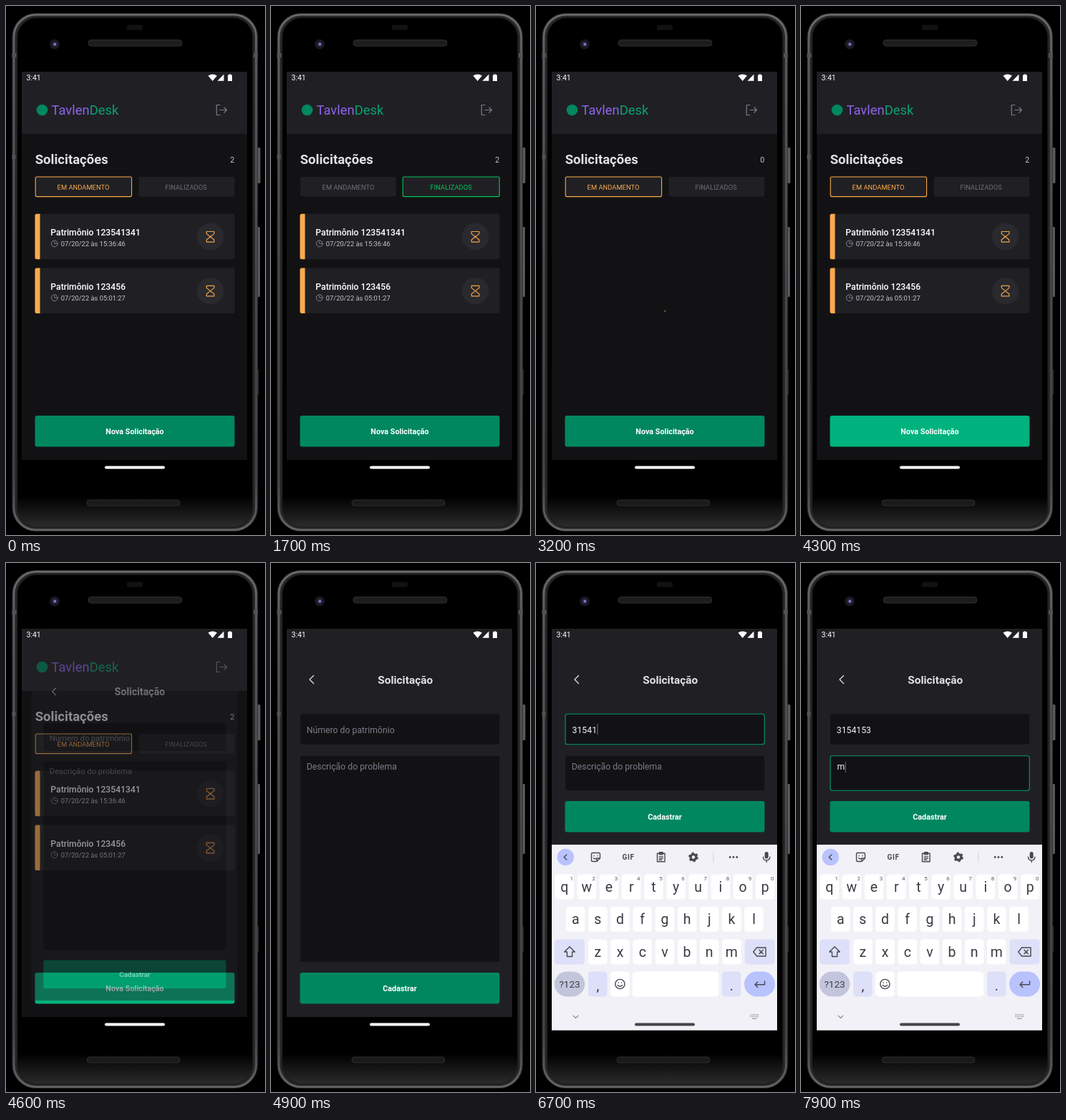
Animation, 362 px wide and 740 px high, one loop 8 s. Source, as an HTML page:

```html
<!DOCTYPE html>
<html lang="pt-BR">
<head>
<meta charset="utf-8">
<title>Solicitações</title>
<style>
html, body { margin: 0; width: 100%; height: 100%; overflow: hidden; background: #000; }
svg { display: block; width: 362px; height: 740px; font-family: Roboto, "Noto Sans", sans-serif; }
text { white-space: pre; }
.line { fill: none; stroke-linecap: round; stroke-linejoin: round; }
.mid { text-anchor: middle; }
.tab { font-size: 9.4px; text-anchor: middle; }
.btn { font-size: 10.8px; font-weight: 700; fill: #fff; text-anchor: middle; }
.field { font-size: 12.25px; }
.letter { font-size: 19.5px; fill: #3b3c43; text-anchor: middle; }
.hint { font-size: 8px; fill: #55565e; text-anchor: middle; }
</style>
</head>
<body>
<svg viewBox="0 0 362 740">
  <defs>
    <linearGradient id="rim" x1="0" y1="0" x2="0" y2="1">
      <stop offset="0" stop-color="#6c6c6e"/><stop offset=".1" stop-color="#5c5c5e"/>
      <stop offset=".5" stop-color="#4a4a4c"/><stop offset=".9" stop-color="#444446"/>
      <stop offset="1" stop-color="#666668"/>
    </linearGradient>
    <linearGradient id="face" x1="0" y1="0" x2="0" y2="1">
      <stop offset=".94" stop-color="#000"/><stop offset="1" stop-color="#2c2c2d"/>
    </linearGradient>
    <clipPath id="glass"><rect x="22" y="92" width="315" height="561.5"/></clipPath>
    <clipPath id="app"><rect x="22" y="92" width="315" height="543"/></clipPath>
    <g id="hourglass" class="line" stroke="#f0a148" stroke-width="1.2">
      <path d="M-5.3-7.3H5.3V-4.2L0 0L-5.3-4.2ZM-5.3 7.3H5.3V4.2L0 0L-5.3 4.2Z"/>
    </g>
  </defs>

  <!-- phone body -->
  <g fill="#5a5a5b">
    <rect x="351" y="198" width="4.5" height="50" rx="1.5"/>
    <rect x="351" y="309" width="4" height="98" rx="1.5"/>
    <rect x="351" y="508" width="2" height="36" rx="1" fill="#333"/>
  </g>
  <rect x="8.5" y="10" width="343.5" height="725" rx="33" fill="#333335"/>
  <rect x="11" y="12.2" width="338.5" height="720.6" rx="31" fill="#29292a" stroke="url(#rim)" stroke-width="2.6"/>
  <rect x="15.5" y="16" width="329.5" height="713" rx="28" fill="url(#face)" stroke="#1c1c1d" stroke-width="1.5"/>
  <path d="M8.5 66h6v6h-6zM8.5 208h5v6h-5zM346 66h6v6h-6z" fill="#525254"/>
  <rect x="169" y="26.5" width="22" height="7" rx="2" fill="#121213"/>
  <rect x="115" y="47.5" width="131" height="8.5" rx="4" fill="#1d1d1e" stroke="#303031"/>
  <rect x="113" y="691" width="130" height="8" rx="4" fill="#1a1a1b" stroke="#2d2d2e"/>
  <circle cx="68" cy="53.5" r="7" fill="#17171d"/>
  <circle cx="68" cy="53.5" r="4" fill="#24233f"/>
  <circle cx="68.3" cy="53.5" r="1.9" fill="#7f7cc8"/>

  <g clip-path="url(#app)">
    <g id="home">
      <rect x="22" y="92" width="315" height="543" fill="#121214"/>
      <rect x="22" y="92" width="315" height="87" fill="#202024"/>
      <circle cx="50.5" cy="145.5" r="7.8" fill="#00875f"/>
      <text x="63.5" y="151.5" font-size="18.4" fill="#8f63f0">Tavlen<tspan fill="#0aa173">Desk</tspan></text>
      <path class="line" d="M299 138.5H294.3V152.5H299M299 145.5H308.5M305 142L308.5 145.5L305 149" stroke="#7c7c8a" stroke-width="1.2"/>
      <text x="40.7" y="221.2" font-size="18.5" font-weight="700" fill="#e1e1e6">Solicitações</text>
      <text id="count" x="319.3" y="219.3" font-size="10.8" text-anchor="end" fill="#c4c4cc"></text>
      <rect id="openBox" y="239" height="27.6" rx="2"/>
      <text id="openText" class="tab" x="108" y="256.6">EM ANDAMENTO</text>
      <rect id="doneBox" y="239" height="27.6" rx="2"/>
      <text id="doneText" class="tab" x="251.7" y="256.6">FINALIZADOS</text>
      <g id="cards"></g>
      <circle id="spinner" class="line" cx="180" cy="433" r="6.3" stroke="#fba94c" stroke-width="1.4" pathLength="100"/>
      <rect id="newBtn" x="40.5" y="573.1" width="279" height="43.4" rx="3"/>
      <text class="btn" x="180" y="598.8">Nova Solicitação</text>
    </g>
  </g>

  <g clip-path="url(#glass)">
    <g id="form">
      <rect x="22" y="92" width="315" height="543" fill="#202024"/>
      <path class="line" d="M59.5 157.5L54 163L59.5 168.5" stroke="#e1e1e6" stroke-width="1.3"/>
      <text class="mid" x="187.7" y="168.6" font-size="15.4" font-weight="700" fill="#e1e1e6">Solicitação</text>
      <rect id="numBox" x="41" y="211.2" width="278.3" height="42.6" rx="3" fill="#121214"/>
      <text id="numText" class="field" y="238"></text>
      <rect id="descBox" x="41" y="269.7" width="278.3" rx="3" fill="#121214"/>
      <text id="descText" class="field" y="289"></text>
      <rect id="caret" width="1" height="15" fill="#74747c"/>
      <g id="send">
        <rect x="40.5" y="573.1" width="279" height="43.4" rx="3" fill="#00875f"/>
        <text class="btn" x="180" y="598.8">Cadastrar</text>
      </g>
    </g>
    <rect id="panel" x="22" y="394" width="315" height="260" fill="#fafafa"/>
    <g id="keys"></g>
    <rect id="strip" x="22" y="635" width="315" height="19" fill="#000" opacity=".42"/>
  </g>
  <rect id="pill" x="138" y="643.6" width="84" height="4" rx="2"/>

  <!-- status bar -->
  <text x="28.5" y="104.4" font-size="10.5" fill="#fff">3:41</text>
  <path d="M282.5 97.5Q288.7 93.3 295 97.5L288.7 105ZM295.5 104.8L304.5 95.6V104.8ZM310 96.6H311.5V95.4H314.5V96.6H316V105H310Z" fill="#fff"/>
</svg>

<script>
const $ = id => document.getElementById(id);
const set = (el, attrs) => { for (const k in attrs) el.setAttribute(k, attrs[k]); };
const show = (el, on) => { el.style.display = on ? "" : "none"; };
const LOOP = 8000, STEP = 100;
const NUMBER = "3154153";

function card(y, number, date) {
  return `<g transform="translate(0 ${y})">
    <rect x="40.5" width="279" height="63.5" rx="3" fill="#202024"/>
    <path d="M47.5 0H43Q40.5 0 40.5 2.5V61Q40.5 63.5 43 63.5H47.5Z" fill="#fba94c"/>
    <text x="62.3" y="30" font-size="12.2" font-weight="500" fill="#fff">Patrimônio ${number}</text>
    <g class="line" stroke="#8d8d99" stroke-width=".9"><circle cx="67.8" cy="41.6" r="4.4"/><path d="M67.8 39V41.6H70.5"/></g>
    <text x="76.8" y="45" font-size="9.4" fill="#c4c4cc">${date}</text>
    <circle cx="285.6" cy="32" r="18.7" fill="#29292e"/>
    <use href="#hourglass" x="285.6" y="32"/>
  </g>`;
}
$("cards").innerHTML = card(290.8, "123541341", "07/20/22 às 15:36:46") +
                       card(366.6, "123456", "07/20/22 às 05:01:27");

const key = (cx, cy, w, fill = "#fff", r = 4.5) =>
  `<rect x="${cx - w / 2}" y="${cy - 17.5}" width="${w}" height="35" rx="${r}" fill="${fill}"/>`;
const icon = (x, y, d, color = "#484950", w = 1.4) =>
  `<path class="line" transform="translate(${x} ${y})" d="${d}" stroke="${color}" stroke-width="${w}"/>`;

function keyboard() {
  const soft = "#dde0f8", pitch = 31.17;
  let s = `<rect x="22" y="394" width="315" height="260" fill="#f2f1f8"/>
    <circle cx="41.3" cy="411.5" r="11.7" fill="#b8c2fd"/>`;
  s += icon(41, 411.5, "M1.8-3.6L-1.8 0L1.8 3.6");
  s += icon(83.5, 411.5, "M-4.5-6H4.5Q6-6 6-4.5V1.5L1.5 6H-4.5Q-6 6-6 4.5V-4.5Q-6-6-4.5-6ZM6 1.5H1.5V6M-2.5-2V-1.8M2.5-2V-1.8M-3 1.2Q-1 3.5 1 1.5");
  s += `<text class="mid" x="129" y="415.2" font-size="10" font-weight="700" letter-spacing=".6" fill="#484950">GIF</text>`;
  s += icon(174.8, 411.5, "M-5.3-5.2H5.3V6.3H-5.3ZM-2.3-6.7H2.3V-3.6H-2.3ZM-2.6-.6H2.6M-2.6 1.6H2.6M-2.6 3.8H1");
  s += `<circle cx="220" cy="411.5" r="3.9" fill="none" stroke="#484950" stroke-width="3.2"/>
    <circle cx="220" cy="411.5" r="5.9" fill="none" stroke="#484950" stroke-width="2" stroke-dasharray="3 3.18"/>
    <path d="M248 404V419" stroke="#d6d5dd"/>`;
  s += [-4.8, 0, 4.8].map(d => `<circle cx="${276 + d}" cy="411.5" r="1.4" fill="#484950"/>`).join("");
  s += `<rect x="319.7" y="404" width="5" height="9.5" rx="2.5" fill="#484950"/>`;
  s += icon(322.2, 411.5, "M-4.7-.3Q-4.5 4.4 0 4.4T4.7-.3M0 4.5V7");
  [["qwertyuiop", 39.7, 453], ["asdfghjkl", 55.2, 498.3], ["zxcvbnm", 86.4, 544]].forEach(([row, x0, y]) =>
    [...row].forEach((c, i) => {
      const x = x0 + i * pitch;
      s += key(x, y, 26.6) + `<text class="letter" x="${x}" y="${y + 7}" data-c="${c}"></text>`;
      if (y === 453) s += `<text class="hint" x="${x + 10}" y="${y - 8.6}">${(i + 1) % 10}</text>`;
    }));
  s += key(47, 544, 42, soft) + key(312.6, 544, 42, soft);
  s += `<path id="shift" transform="translate(47 544)" d="M0-7.3L7.3 0H3.6V6.5H-3.6V0H-7.3Z" stroke="#484950" stroke-width="1.4" stroke-linejoin="round"/>`;
  s += icon(312.6, 544, "M-4-6H8.5V6H-4L-8.8 0ZM-.6-2.7L4.8 2.7M4.8-2.7L-.6 2.7");
  s += key(47, 589, 42.5, "#c2c5dc", 17.5) + key(86.3, 589, 26.5, soft) + key(117.4, 589, 26.5) +
       key(195, 589, 120.5) + key(273.3, 589, 26.5, soft) + key(312.6, 589, 43, "#b8c2fd", 17.5);
  s += `<text class="mid" x="47" y="593.8" font-size="13.5" fill="#3b3c43">?123</text>
    <text class="letter" x="86.3" y="598">,</text><text class="letter" x="273.3" y="598">.</text>
    <circle cx="117.4" cy="589" r="6.6" fill="none" stroke="#484950" stroke-width="1.4"/>`;
  s += icon(117.4, 589, "M-2.3-2V-1.7M2.3-2V-1.7M-3.2 1.5Q0 5 3.2 1.5");
  s += icon(312.6, 589, "M7-4V.8H-6.5M-2.8-3L-6.5 .8L-2.8 4.6");
  s += icon(55.5, 634.7, "M-3.5-1.6L0 1.8L3.5-1.6", "#8a8a92", 1.2);
  s += `<path d="M299.5 632H311M299.5 634.5H311" stroke="#9a9aa2" stroke-width="1.4" stroke-dasharray="1.5 1"/>
    <path d="M302 637.3H308.5" stroke="#9a9aa2" stroke-width="1.3"/>`;
  return s;
}
$("keys").innerHTML = keyboard();
const letters = [...document.querySelectorAll("[data-c]")];

function tab(name, on, x, width, color) {
  set($(name + "Box"), { x, width, fill: "#202024", stroke: on ? color : "none", "stroke-width": 1.1 });
  set($(name + "Text"), { fill: on ? color : "#6d6d76" });
}

function input(name, value, hint, focus) {
  const text = $(name + "Text");
  text.textContent = value || hint;
  set(text, { x: focus ? 50.6 : 49.8, fill: value ? "#f2f2f4" : "#7c7c8a" });
  set($(name + "Box"), { stroke: focus ? "#05996c" : "none", "stroke-width": 1.1 });
}

function drawHome(t) {
  const done = t >= 1700 && t < 3000;
  const loadStart = t >= 1800 && t < 2300 ? 1900 : t >= 3100 && t < 3800 ? 3200 : 0;
  const empty = t >= 2300 && t < 3800;
  tab("open", !done, 41.2, done ? 133.4 : 134.4, "#fba94c");
  tab("done", done, done ? 184.3 : 185.6, done ? 135 : 133.8, "#04c45c");
  $("count").textContent = empty ? 0 : 2;
  show($("cards"), !loadStart && !empty);

  const age = t - loadStart;
  show($("spinner"), loadStart && age >= 0);
  const arc = 1 + 74 * Math.min(1, Math.max(0, age) / 667) ** 1.5;
  set($("spinner"), { "stroke-dasharray": `${arc} ${100 - arc}`, transform: `rotate(${-90 + age * .22} 180 433)` });
  set($("newBtn"), { fill: t >= 4200 ? "#00b37e" : "#00875f" });
}

function drawForm(t) {
  const open = t >= 6000, second = t >= 7100;
  const p = Math.min(1, Math.max(0, (t - 4500) / 400));
  const e = 1 - (1 - p) ** 2, scale = .85 + .15 * e;
  show($("form"), p > 0);
  set($("form"), { opacity: e, transform: `translate(180 363.5) scale(${scale}) translate(-180 -363.5)` });

  const typed = NUMBER.slice(0, Math.max(0, Math.floor((t - 6200) / 100)));
  const message = t >= 7900 ? "m" : "";
  input("num", typed, "Número do patrimônio", open && !second);
  input("desc", message, "Descrição do problema", second);
  set($("descBox"), { height: open ? 48.6 : 288.2 });
  set($("send"), { transform: `translate(0 ${open ? -240 : 0})` });

  const value = second ? message : typed;
  const width = value ? $(second ? "descText" : "numText").getComputedTextLength() : 0;
  show($("caret"), t >= 5800 && !(t >= 7600 && t < 7900));
  set($("caret"), { x: 50.2 + width + (value ? 0.8 : 0), y: second ? 278 : 225 });

  const rise = Math.min(1, Math.max(0, (t - 6000) / 200));
  const left = (1 - rise) ** 1.6;
  const caps = second ? !message : !typed;
  show($("panel"), open);
  show($("keys"), open);
  show($("strip"), open && rise < 1);
  set($("keys"), { transform: `translate(0 ${83 * left})`, opacity: 1 - .28 * left });
  letters.forEach(el => { el.textContent = caps ? el.dataset.c.toUpperCase() : el.dataset.c; });
  set($("shift"), { fill: caps ? "#484950" : "none" });
  set($("pill"), { fill: open && rise === 1 ? "#45454a" : "#fff" });
}

function frame(now) {
  const t = Math.floor(now % LOOP / STEP) * STEP;
  drawHome(t);
  drawForm(t);
  requestAnimationFrame(frame);
}
frame(performance.now());
</script>
</body>
</html>
```
